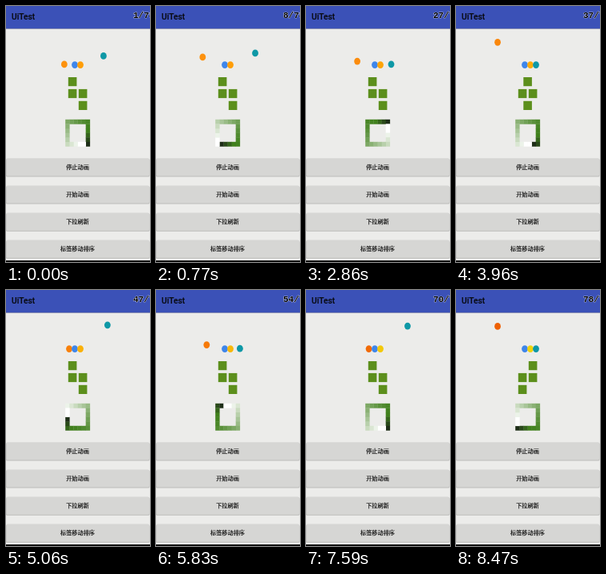
Animation of 180 by 320 pixels, one loop 8580 ms. Source, as an HTML page:

```html
<!DOCTYPE html>
<html lang="zh">
<head>
<meta charset="utf-8">
<style>
html, body { margin: 0; width: 100%; height: 100%; overflow: hidden; background: #ececea; }
svg { display: block; width: 100vw; height: 100vh; }
.title { font: 500 10.2px Roboto, sans-serif; fill: #0a0c14; stroke: #0a0c14; stroke-width: .2px; }
.count { font: bold 11px "Liberation Mono", monospace; fill: #000; stroke: #fff; stroke-width: .7px; paint-order: stroke; }
.label { font: 7.15px "Noto Sans CJK SC", "Noto Sans CJK", sans-serif; fill: #111; stroke: #111; stroke-width: .2px; text-anchor: middle; }
</style>
</head>
<body>
<svg id="stage" viewBox="0 0 180 320" preserveAspectRatio="none"></svg>
<script>
const STEP = 110, COUNT = 78, SWING = 1490, SWING_START = 3960;
const SIDE = 5, CELLS = 4 * SIDE, CELLS_PER_FRAME = .584;
const ARM = 27, REST_Y = 73.6;
const stage = document.getElementById('stage');

function set(el, attrs) {
  for (const key in attrs) el.setAttribute(key, attrs[key]);
}
function add(tag, attrs, text) {
  const el = document.createElementNS('http://www.w3.org/2000/svg', tag);
  set(el, attrs);
  if (text) el.textContent = text;
  return stage.appendChild(el);
}
const rect = (x, y, width, height, fill, rx = 0) => add('rect', { x, y, width, height, fill, rx });
const clamp = v => Math.min(1, Math.max(0, v));
const wrap = (v, n) => (v % n + n) % n;
const mix = (a, b, k) => `rgb(${a.map((v, i) => Math.round(v + (b[i] - v) * k))})`;

rect(0, 0, 180, 28, '#3b51b7');
rect(0, 28, 180, 1, '#8d93b4');
add('text', { x: 7, y: 17, class: 'title' }, 'UiTest');
const counter = add('text', { x: 159, y: 15, class: 'count' });

['停止动画', '开始动画', '下拉刷新', '标签移动排序'].forEach((label, i) => {
  const y = 190.3 + i * 34.1;
  rect(0, y + .8, 179.5, 22.4, '#bdbdbb', 1.5);
  rect(.4, y, 178.6, 22.2, '#d6d6d4', 1.5);
  add('text', { x: 89.5, y: y + 13.7, class: 'label' }, label);
});
rect(0, 318, 180, 2, '#111');

const ball = (cx, fill) => add('ellipse', { cx, cy: REST_Y, rx: 3.9, ry: 4.4, fill });
const leftBall = ball(79);
ball(86, '#3f86ea');
const midBall = ball(93);
const rightBall = ball(100, '#0e98a6');

const tile = (x, y) => rect(x, y, 10.6, 11.2, '#5c8f1c');
const topTile = tile(77.8, 89);
tile(77.8, 103.9);
tile(90.8, 103.9);
const lowTile = tile(90.8, 118.8);

// Cells run clockwise around the square from its top left corner.
const ring = Array.from({ length: CELLS }, (_, i) => {
  const side = Math.floor(i / SIDE), k = i % SIDE;
  const col = [k, SIDE, SIDE - k, 0][side], row = [0, k, SIDE, SIDE - k][side];
  return rect(74.2 + col * 5.1, 141.8 + row * 5.6, 5.4, 5.9);
});

const DARK = [30, 46, 24], GREEN = [64, 128, 28], WHITE = [255, 255, 255];
function shade(age) {
  return age < 3 ? mix(DARK, GREEN, age / 3) : mix(GREEN, WHITE, clamp((age - 3) / 15) ** 1.5);
}

function hang(el, x, degrees) {
  const a = degrees * Math.PI / 180;
  set(el, { cx: x + ARM * Math.sin(a), cy: REST_Y - ARM * (1 - Math.cos(a)) });
}

// Quick rise, slow return.
function leftLift(phase) {
  const u = clamp(wrap(phase - .77, 1) / .7);
  return Math.sin(Math.PI * u ** .65) ** 2;
}
// Rise, rest at the top, fall.
function rightLift(phase) {
  return clamp(1.3 * Math.sin(Math.PI * clamp((phase - .235) / .75)));
}
function swapAmount(phase) {
  const edge = .11 * 2 * Math.PI;
  return clamp(.5 + 6 * (Math.cos(2 * Math.PI * phase - edge) - Math.cos(edge)));
}

function draw(ms) {
  const frame = Math.floor(ms / STEP) % COUNT;
  const phase = wrap((frame * STEP - SWING_START) / SWING, 1);
  const aging = (frame / (COUNT - 1)) ** 2;
  counter.textContent = `${frame + 1}/${COUNT}`;

  hang(leftBall, 79, -93 * leftLift(phase));
  hang(rightBall, 100, 96 * rightLift(phase));
  set(leftBall, { fill: mix([253, 146, 14], [238, 96, 4], aging) });
  set(midBall, { fill: mix([255, 158, 8], [240, 212, 10], aging) });

  const shift = 13 * swapAmount(phase);
  set(topTile, { x: 77.8 + shift });
  set(lowTile, { x: 90.8 - shift });

  const head = Math.round(10 + frame * CELLS_PER_FRAME);
  ring.forEach((cell, i) => set(cell, { fill: shade(wrap(head - i, CELLS)) }));
}

const start = performance.now();
function tick() {
  draw(performance.now() - start);
  requestAnimationFrame(tick);
}
tick();
</script>
</body>
</html>
```
